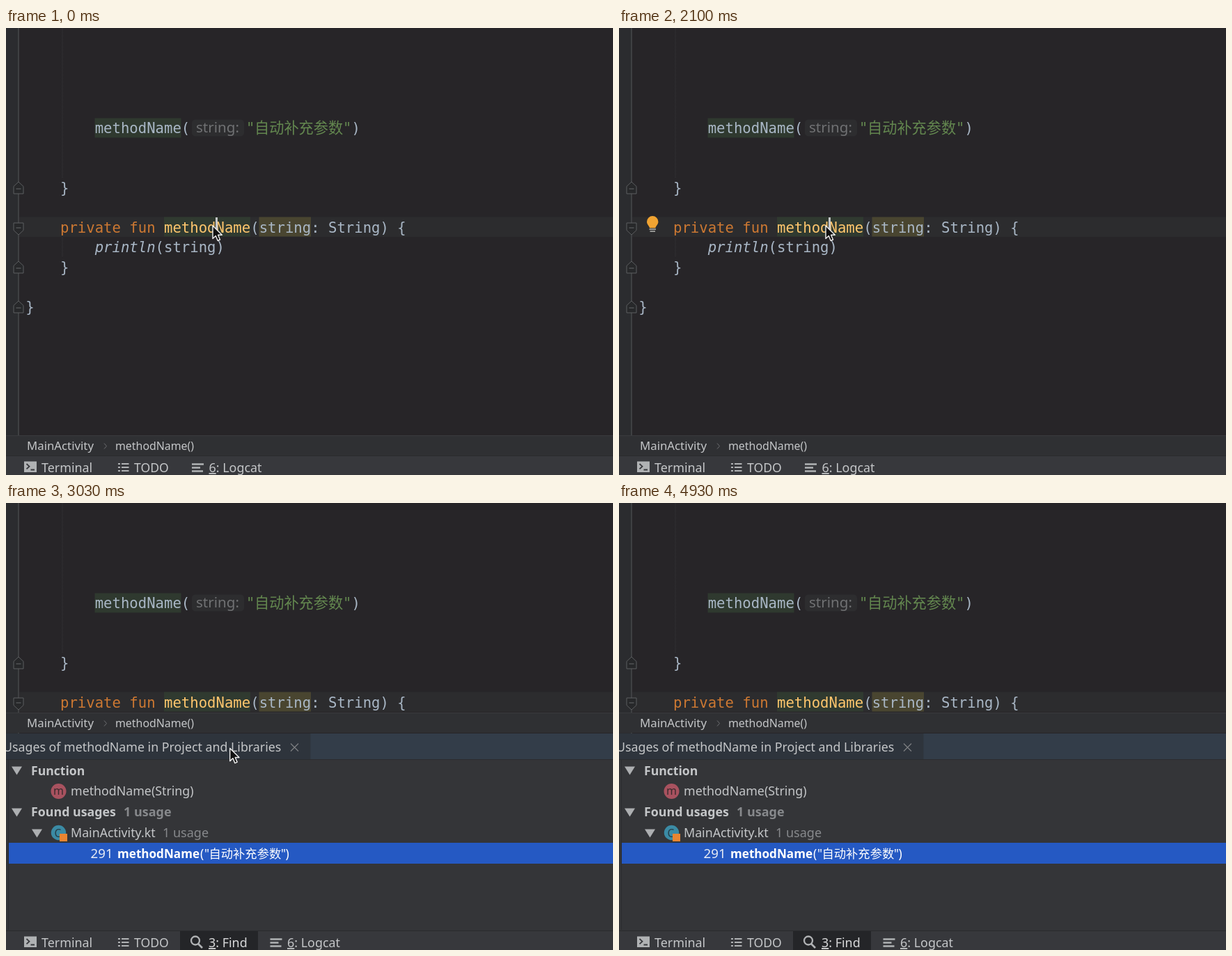
An HTML page that plays this animation: 872 by 642 pixels, repeating every 4960 ms.

```html
<!DOCTYPE html>
<html lang="en">
<head>
<meta charset="utf-8">
<title>Find usages</title>
<style>
  html, body { margin: 0; width: 100%; height: 100%; overflow: hidden; background: #272528; }
  svg { display: block; width: 872px; height: 642px; }
  text { white-space: pre; font-family: "Noto Sans", "Noto Sans CJK SC", "Noto Sans CJK", sans-serif; }
  .code { font-family: "DejaVu Sans Mono", "Noto Sans CJK SC", "Noto Sans CJK", monospace; font-size: 20.63px; }
</style>
</head>
<body>
<svg id="stage" viewBox="0 0 872 642" lang="zh-CN"></svg>
<script>
const LOOP = 4960, OPEN = 2170, FOCUS = 2340;
const PLAIN = '#a9b7c6', UI = '#c4c6c8', DIM = '#87898c', BAR = '#37383c', PANEL = '#343538';
const ARGUMENT = '自动补充参数';

const rect = (x, y, w, h, fill, more = '') =>
  `<rect x="${x}" y="${y}" width="${w}" height="${h}" fill="${fill}" ${more}/>`;
const line = (d, color, width = 1, more = '') =>
  `<path d="${d}" fill="none" stroke="${color}" stroke-width="${width}" ${more}/>`;
const shape = (d, fill) => `<path d="${d}" fill="${fill}"/>`;
const group = (id, ...parts) => `<g id="${id}">${parts.join('')}</g>`;
const ui = (x, y, text, size = 17.8, fill = UI, more = '') =>
  `<text x="${x}" y="${y}" font-size="${size}" fill="${fill}" ${more}>${text}</text>`;
const BOLD = 'font-weight="700"';

// Code sits on a monospaced grid of columns.
const column = c => 28.3 + 12.42 * c;
const code = (c, y, text, fill = PLAIN, more = '') =>
  `<text class="code" x="${column(c)}" y="${y}" fill="${fill}" ${more}>${text}</text>`;

const fold = (y, flip = 1) =>
  `<g transform="translate(18 ${y}) scale(1 ${flip})">
    <path d="M-7 8V-2.5L0 -9L7 -2.5V8Z" fill="#27282a" stroke="#5c5e60"/>
    ${line('M-3.5 1H3.5', '#66686a')}</g>`;

const triangle = (x, y) => shape(`M${x - 7} ${y - 5.5}h15l-7.5 12z`, '#adafb1');

function editor() {
  return [
    rect(0, 0, 872, 642, '#272528'),
    rect(0, 0, 18, 642, '#2b2c2f'),
    rect(19, 271.5, 853, 28.5, '#2c2c2e'),
    line('M18 0V642', '#56585a'),
    line('M81 0V215M81 301V329', '#38383a', 1, 'stroke-dasharray="1 1"'),
    fold(230), fold(288, -1), fold(344), fold(401),
    rect(127.5, 129.5, 124, 28, '#2f392f'),
    rect(227, 271.5, 124, 28, '#303a30'),
    rect(363.5, 271.5, 74.5, 28, '#494530'),
    code(8, 151, 'methodName('),
    rect(267, 131.5, 75, 24, '#2d2d2f', 'rx="5"'),
    ui(273, 150, 'string:', 20.6, '#707173'),
    `<text class="code" x="345" y="151" fill="#63874f">"</text>`,
    `<text class="code" x="357" y="151" fill="#63874f" style="font-size:21.2px">${ARGUMENT}</text>`,
    `<text class="code" x="484" y="151" fill="#63874f">"<tspan fill="${PLAIN}">)</tspan></text>`,
    code(4, 237, '}'),
    code(4, 293.5, 'private fun', '#cc7832'),
    code(16, 293.5, 'methodName', '#ffc66d'),
    code(26, 293.5, '(string: String) {'),
    code(8, 322, 'println', PLAIN, 'font-style="italic"'),
    code(15, 322, '(string)'),
    code(4, 350.5, '}'),
    code(0, 408, '}'),
    group('bulb',
      shape('M40 278.3a8.2 8.2 0 1 1 16.4 0c0 4-3.3 5.5-4 9h-8.4c-.7-3.5-4-5-4-9z', '#f0a332'),
      line('M43.5 289h9.5M44.5 292h7.5', '#b5b6b4', 1.5)),
    rect(301, 272, 3, 27.5, '#c4c6c8', 'id="caret"')
  ].join('');
}

function breadcrumb() {
  return group('crumbs',
    rect(0, 585, 872, 29, '#2f3033'),
    line('M0 585.5H872', '#3a3b3e'),
    ui(30, 606, 'MainActivity', 16.8),
    line('M141 596.5l3.5 4-3.5 4', '#6d6e71'),
    ui(157, 606, 'methodName()', 15.9));
}

function findPanel() {
  return group('panel',
    rect(0, 331, 872, 311, PANEL),
    rect(0, 331, 872, 38, '#303134', 'id="header"'),
    rect(0, 331, 437.5, 38, '#393a3e', 'id="tab"'),
    line('M0 368.5H872', '#2b2c2f'),
    ui(-4, 357, 'Usages of methodName in Project and Libraries'),
    line('M409 345.5l11 11m0-11l-11 11', '#7c7e81', 1.3),
    rect(4, 369, 868, 30, '#0f2136', 'id="idleRow"'),
    rect(4, 488, 868, 30, '#2559c3', 'id="activeRow"'),
    line('M3.5 369V613', '#2b2c2f'),
    triangle(15, 384), ui(36, 390.5, 'Function', 17.6, UI, BOLD),
    '<circle cx="75.5" cy="414" r="11" fill="#a8525f"/>',
    ui(75.5, 419, 'm', 16, '#3a2a2e', 'text-anchor="middle"'),
    ui(93, 420, 'methodName(String)'),
    triangle(15, 444), ui(36, 450, 'Found usages', 17.8, UI, BOLD),
    ui(169, 450, '1 usage', 18, DIM, BOLD),
    triangle(44, 474),
    '<circle cx="75.5" cy="473.5" r="10.7" fill="#3b8ba5"/>',
    ui(74.5, 479.5, 'C', 15.5, '#263d47', 'text-anchor="middle"'),
    rect(77, 475, 11, 11, '#e98531'),
    ui(93, 480, 'MainActivity.kt'),
    ui(225, 480, '1 usage', 18, DIM),
    group('fileIcon',
      shape('M103 492h9v22h-16v-15h7z', '#96999c'),
      shape('M101.5 492v5.5h-5.5z', '#b3b5b7'),
      rect(105, 504, 11, 11, '#e98531')),
    ui(121.5, 509.5, '291', 18.7, DIM, 'id="lineNo"'),
    ui(160, 509.5, 'methodName', 17.1, PLAIN, `${BOLD} class="call"`),
    ui(279, 509.5, '(', 17.5, PLAIN, 'class="call"'),
    ui(285, 509.5, '"', 17.3, '#63874f', 'class="literal"'),
    ui(291.5, 509.5, ARGUMENT, 17.3, '#63874f', 'class="literal"'),
    ui(395, 509.5, '"', 17.3, '#63874f', 'class="literal"'),
    ui(401.5, 509.5, ')', 17.5, PLAIN, 'class="call"'));
}

function toolbar() {
  const bullets = [626, 631, 636].map(y => `M161 ${y}h3M166 ${y}h10.5`).join('');
  return [
    rect(0, 614, 872, 28, BAR),
    line('M0 614.5H872', '#2a2b2d'),
    rect(26, 622.5, 18, 15.5, '#b0b2b4'),
    line('M29.5 626l4 3.7-4 3.7M35.5 634.5h5.5', BAR, 1.8),
    ui(51, 638, 'Terminal', 17.9),
    line(bullets, '#b0b2b4', 2),
    ui(184, 638, 'TODO', 17.6),
    group('findButton',
      rect(250, 615, 112, 27, '#242528'),
      '<circle cx="272" cy="628.5" r="6" fill="none" stroke="#b0b2b4" stroke-width="2.3"/>',
      line('M276 633l6 6', '#b0b2b4', 2.7),
      ui(291, 638, '<tspan text-decoration="underline">3</tspan>: Find', 17.9, '#d8d9da')),
    group('logcat',
      line('M267 626.5h17M267 631.5h12M267 636.5h16', '#b0b2b4', 2.3),
      ui(291.5, 638, '<tspan text-decoration="underline">6</tspan>: Logcat', 17.9))
  ].join('');
}

function pointers() {
  const beam = 'M-4 -9.5Q0 -9.5 0 -6Q0 -9.5 4 -9.5M0 -6V6M-4 9.5Q0 9.5 0 6Q0 9.5 4 9.5M-2.5 2H2.5';
  return group('arrow',
    `<path d="M0 0V18.5L4.3 14.5L7.2 21.5L10.5 20L7.6 13.3H13.3Z"
      fill="#111" stroke="#eee" stroke-width="1.4" stroke-linejoin="round"/>`) +
    group('beam', line(beam, '#151515', 3), line(beam, '#e4e4e4', 1.4));
}

const stage = document.getElementById('stage');
stage.innerHTML = editor() + findPanel() + breadcrumb() + toolbar() + pointers();

const el = id => document.getElementById(id);
const show = (id, on) => el(id).setAttribute('visibility', on ? 'visible' : 'hidden');
const move = (id, x, y) => el(id).setAttribute('transform', `translate(${x} ${y})`);
const paint = (node, fill) => node.setAttribute('fill', fill);
const paintAll = (name, fill) => stage.querySelectorAll('.' + name).forEach(n => paint(n, fill));

// Pointer stops: time, x, y
const route = [
  [0, 297, 284], [2450, 297, 284], [2650, 334, 301], [2720, 334, 301],
  [3100, 320.5, 357], [3770, 320.5, 357], [3990, 732, 245.5], [LOOP, 732, 245.5]
];

function pointerAt(t) {
  const i = route.findIndex(stop => stop[0] > t);
  const [t0, x0, y0] = route[i - 1], [t1, x1, y1] = route[i];
  const p = (t - t0) / (t1 - t0), k = p * p * (3 - 2 * p);
  return [x0 + (x1 - x0) * k, y0 + (y1 - y0) * k];
}

function draw(t) {
  const open = t >= OPEN, focused = t >= FOCUS;
  const [x, y] = pointerAt(t);
  const pointerOn = t < OPEN || (t >= 2450 && t < 4220);
  const overCode = t > 3770 && y < 302;

  show('panel', open);
  show('findButton', open);
  move('crumbs', 0, open ? -284 : 0);
  move('logcat', open ? 112.5 : 0, 0);

  show('bulb', t >= 300 && !open);
  show('caret', !focused && (t + 230) % 1000 < 500);

  show('idleRow', open && !focused);
  show('activeRow', focused);
  show('fileIcon', open && !focused);
  paint(el('header'), focused ? '#333d49' : '#303134');
  paint(el('tab'), focused ? '#2e343c' : '#393a3e');
  paint(el('lineNo'), focused ? '#e8ecf4' : DIM);
  paintAll('call', focused ? '#fff' : PLAIN);
  paintAll('literal', focused ? '#fff' : '#63874f');

  show('arrow', pointerOn && !overCode);
  show('beam', pointerOn && overCode);
  move('arrow', x, y);
  move('beam', x, y);
}

const start = performance.now();
function tick() {
  draw((performance.now() - start) % LOOP);
  requestAnimationFrame(tick);
}
draw(0);
requestAnimationFrame(tick);
</script>
</body>
</html>
```
